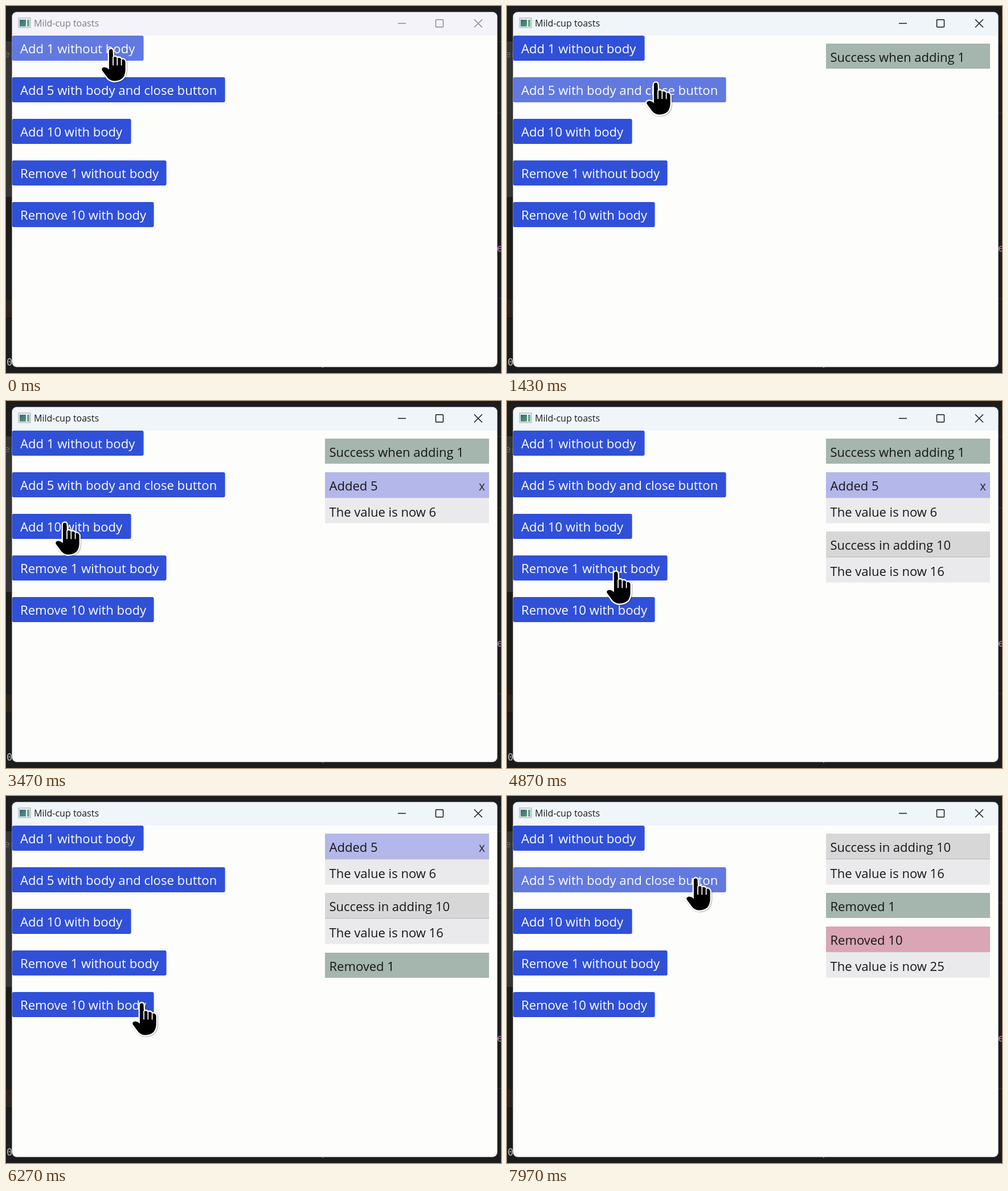
An HTML page with a canvas that plays this animation: 869 by 644 pixels, repeating every 8000 ms.

```html
<!DOCTYPE html>
<html lang="en">
<head>
<meta charset="utf-8">
<title>Toasts</title>
<style>
  html, body { margin: 0; width: 100%; height: 100%; overflow: hidden; background: #1c1c1a; }
  canvas { display: block; }
</style>
</head>
<body>
<canvas id="stage" width="869" height="644"></canvas>
<script>
const ctx = document.getElementById('stage').getContext('2d');
const LOOP = 8000;
const SANS = '"Open Sans", "Noto Sans", sans-serif';
const MONO = '"DejaVu Sans Mono", monospace';
const FOCUS_AT = 220;

const buttons = [
  { label: 'Add 1 without body', right: 241.6 },
  { label: 'Add 5 with body and close button', right: 384.6 },
  { label: 'Add 10 with body', right: 219.6 },
  { label: 'Remove 1 without body', right: 281.6 },
  { label: 'Remove 10 with body', right: 259.6 }
].map((b, i) => ({ ...b, x: 10.7, y: 52 + i * 73, w: b.right - 10.7, h: 44 }));

const toasts = [
  { from: 320, to: 5400, title: 'Success when adding 1', color: '#a4b6ae' },
  { from: 1980, to: 7050, title: 'Added 5', body: 'The value is now 6', color: '#b3b7e9', closable: true },
  { from: 3540, to: Infinity, title: 'Success in adding 10', body: 'The value is now 16', color: '#d7d7d8' },
  { from: 4930, to: Infinity, title: 'Removed 1', color: '#a4b6ae' },
  { from: 6330, to: Infinity, title: 'Removed 10', body: 'The value is now 25', color: '#daa5b4' }
];

const presses = [[220, 320], [1880, 1980], [3420, 3540], [4820, 4930], [6220, 6330]];

// time, x, y of the fingertip
const path = [
  [0, 185, 74], [650, 185, 74], [1350, 262, 133], [1500, 262, 133],
  [1800, 281, 143], [2750, 281, 143], [3380, 104, 212], [4050, 104, 212],
  [4750, 192, 298], [5350, 192, 298], [6050, 239, 362], [6900, 239, 362],
  [7850, 332, 143], [8000, 332, 143]
];

const hand = new Path2D('M-3.3 3.5Q-3.3 0 0 0Q3.3 0 3.3 3.5L3.8 15Q8 11.5 11 16Q15.5 13.5 18.5 18.5' +
  'Q23.5 16.5 25.4 22L25.4 38Q24.5 47 20.5 51Q15 56 5 56Q-3 55 -7 49L-15.5 37.5Q-17.5 33 -12 32Q-7 32 -3.3 36Z');
const fingerGaps = new Path2D('M3.8 14V28M11.1 16V28M18.4 19V28');

function pointer(t) {
  const i = Math.max(1, path.findIndex(p => p[0] > t));
  const [t0, x0, y0] = path[i - 1], [t1, x1, y1] = path[i];
  const u = (t - t0) / (t1 - t0), e = u * u * (3 - 2 * u);
  return { x: x0 + (x1 - x0) * e, y: y0 + (y1 - y0) * e };
}

function rect(x, y, w, h, color) {
  ctx.fillStyle = color;
  ctx.fillRect(x, y, w, h);
}

function roundRect(x, y, w, h, r, color) {
  ctx.fillStyle = color;
  ctx.beginPath();
  ctx.roundRect(x, y, w, h, r);
  ctx.fill();
}

function text(str, x, y, size, color, family = SANS) {
  ctx.font = `${size}px ${family}`;
  ctx.fillStyle = color;
  ctx.fillText(str, x, y);
}

function drawBackdrop() {
  rect(0, 0, 869, 644, '#1c1c1c');
  rect(0, 62, 11, 273, '#343434');
  rect(0, 515, 11, 32, '#2a231b');
  rect(0, 547, 11, 1, '#0b0b0c');
  for (const y of [62, 187, 513]) rect(862, y, 7, 1, '#34343c');
  rect(555, 633, 2, 2, '#a0a0a0');
  text('er', -3, 90, 16, '#6e6e70', MONO);
  text('0', 1, 631, 17, '#b9b9b4', MONO);
  text('e', 862, 431, 17, '#b57fab', MONO);
}

function drawWindow(focused) {
  roundRect(10, 10, 853, 624, 9, '#8e8f92');
  roundRect(11, 11, 851, 622, 8, '#fdfdfc');
  roundRect(11, 11, 851, 41, [8, 8, 0, 0], focused ? '#eff5f9' : '#f3f3f9');

  rect(21.5, 20.5, 22, 18, '#b5bab9');
  rect(23, 22, 19, 15, '#f5f7f7');
  const g = ctx.createLinearGradient(24, 24, 34, 36);
  g.addColorStop(0, '#3c6686');
  g.addColorStop(1, '#4f9a70');
  rect(24, 24, 11, 12, g);
  rect(37, 24, 4, 12, '#69a58a');

  const ink = focused ? '#161616' : '#8b8b8b';
  text('Mild-cup toasts', 49, 36, 16, focused ? '#1b1b1b' : '#7d7d7f');
  ctx.strokeStyle = ink;
  ctx.lineWidth = 1.5;
  ctx.beginPath();
  ctx.moveTo(688, 30.5);
  ctx.lineTo(702, 30.5);
  ctx.roundRect(754.5, 24, 13, 13, 1);
  ctx.moveTo(822, 23.5);
  ctx.lineTo(836, 37.5);
  ctx.moveTo(836, 23.5);
  ctx.lineTo(822, 37.5);
  ctx.stroke();
}

function drawButtons(p, pressed) {
  for (const b of buttons) {
    const over = p.x >= b.x && p.x <= b.right && p.y >= b.y && p.y <= b.y + b.h;
    roundRect(b.x, b.y, b.w, b.h, 3, over && !pressed ? '#6279e0' : '#3050d8');
    text(b.label, 25, b.y + 31, 22.1, '#fff');
  }
}

function drawToasts(t) {
  let y = 66;
  for (const toast of toasts) {
    if (t < toast.from || t >= toast.to) continue;
    const top = Math.round(y);
    rect(560, top, 288, 44, toast.color);
    text(toast.title, 567.5, top + 32, 22, '#161618');
    if (toast.closable) text('x', 830, top + 32, 21, '#2a2a2e');
    if (toast.body) {
      rect(560, top + 44, 288, 1.5, '#bbbbc0');
      rect(560, top + 45.5, 288, 44, '#eaeaec');
      text(toast.body, 567.5, top + 78, 22, '#161618');
    }
    y += (toast.body ? 89.7 : 44) + 14.6;
  }
}

function drawHand({ x, y }) {
  ctx.save();
  ctx.translate(x - 0.8, y + 1.6);
  ctx.lineJoin = ctx.lineCap = 'round';
  ctx.strokeStyle = '#fff';
  ctx.lineWidth = 4.6;
  ctx.shadowColor = 'rgba(0,0,0,.4)';
  ctx.shadowBlur = 2;
  ctx.shadowOffsetX = ctx.shadowOffsetY = 0.7;
  ctx.stroke(hand);
  ctx.shadowColor = 'transparent';
  ctx.fillStyle = '#000';
  ctx.fill(hand);
  ctx.lineWidth = 1.8;
  ctx.stroke(fingerGaps);
  ctx.restore();
}

function draw(t) {
  const p = pointer(t);
  const pressed = presses.some(([a, b]) => t >= a && t < b);
  drawBackdrop();
  drawWindow(t >= FOCUS_AT);
  drawButtons(p, pressed);
  drawToasts(t);
  drawHand(p);
}

const start = performance.now();
function tick() {
  draw((performance.now() - start) % LOOP);
  requestAnimationFrame(tick);
}
tick();
</script>
</body>
</html>
```
